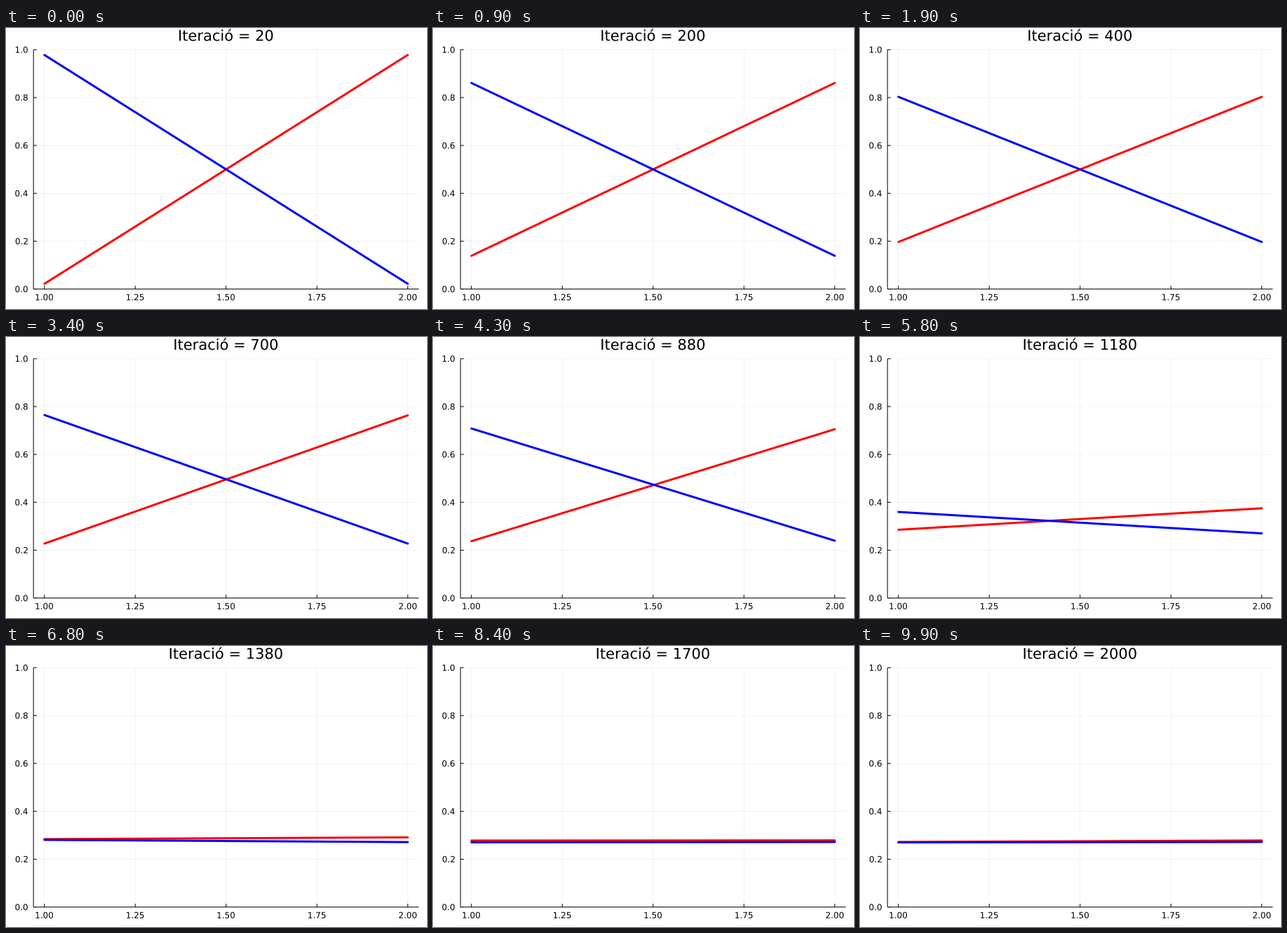
Animation of 600 by 400 pixels, one loop 10 s. Source, as a matplotlib script:

```python
import numpy as np
import matplotlib.pyplot as plt
from matplotlib.animation import FuncAnimation
from matplotlib.patches import PathPatch
from matplotlib.textpath import TextPath
from matplotlib.transforms import Affine2D

W, H, DPI = 600, 400, 100
PX = 72 / DPI
LEFT, RIGHT, TOP, BOTTOM = 39.15, 588.19, 30.87, 371.61
TICK = 4.72
FRAMES, STEP = 100, 20

plt.rcParams["font.family"] = "DejaVu Sans"

# One full-size axes in pixel units, y pointing up.
fig = plt.figure(figsize=(W / DPI, H / DPI), dpi=DPI, facecolor="white")
ax = fig.add_axes([0, 0, 1, 1])
ax.set(xlim=(0, W), ylim=(0, H))
ax.axis("off")


def px(x):
    return LEFT + (x - 0.97) / 1.06 * (RIGHT - LEFT)


def py(y):
    return H - BOTTOM + y * (BOTTOM - TOP)


def stroke(xs, ys, width=1, color="black", **style):
    style.setdefault("solid_capstyle", "butt")
    return ax.plot(xs, ys, color=color, linewidth=width * PX,
                   snap=False, **style)[0]


def text_path(x, y, text, size, align=0.5):
    """Outline of a text whose ink is aligned at x, with baseline y."""
    path = TextPath((0, 0), text, size=size)
    box = path.get_extents()
    return path.transformed(
        Affine2D().translate(x - box.x0 - align * box.width, y))


def label(*args):
    return ax.add_patch(PathPatch(text_path(*args), facecolor="black",
                                  linewidth=0, snap=False))


def title_path(step):
    return text_path((LEFT + RIGHT) / 2, H - 18.2, f"Iteració = {step}", 21)


left, right, floor, ceiling = LEFT, RIGHT, py(0), py(1)
for v in np.linspace(1, 2, 5):
    x = px(v)
    stroke([x, x], [floor, ceiling], 0.5, alpha=0.1)
    stroke([x, x], [floor, floor + TICK])
    label(x, H - 387.5, f"{v:.2f}", 12)
for v in np.linspace(0, 1, 6):
    y = py(v)
    stroke([left, right], [y, y], 0.5, alpha=0.1)
    stroke([left, left + TICK], [y, y])
    label(30.8, y - 4.4, f"{v:.1f}", 12, 1)
stroke([left, right], [floor, floor])
stroke([left, left], [floor, ceiling])


def sigmoid(t, mid, width):
    return 1 / (1 + np.exp((mid - t) / width))


def mix(t):
    """Slow exponential mixing of the lower end."""
    return 0.239 * (1 - 0.99 * np.exp(-0.0043 * t))


def red_ends(t):
    gain = 0.053 - 2e-5 * (t - 1000)
    low = mix(t) + gain * sigmoid(t, 1010, 50)
    high = 1 - mix(t) - 0.483 * sigmoid(t, 1054, 90)
    return low, high


def blue_ends(t):
    high = 1 - mix(t) - 0.491 * sigmoid(t, 1051, 85)
    low = mix(t) + 0.033 * sigmoid(t, 955, 50)
    return high, low


ends_x = [px(1), px(2)]
red = stroke(ends_x, [0, 0], 3, "#ff0000", solid_capstyle="round", zorder=3)
blue = stroke(ends_x, [0, 0], 3, "#0000ff", solid_capstyle="round", zorder=4)
title = ax.add_patch(PathPatch(title_path(STEP), facecolor="black",
                               linewidth=0, snap=False))


def update(k):
    t = STEP * (k + 1)
    red.set_ydata([py(v) for v in red_ends(t)])
    blue.set_ydata([py(v) for v in blue_ends(t)])
    title.set_path(title_path(t))
    return red, blue, title


anim = FuncAnimation(fig, update, frames=FRAMES, interval=100,
                     repeat=True, repeat_delay=0)
plt.show()
```
